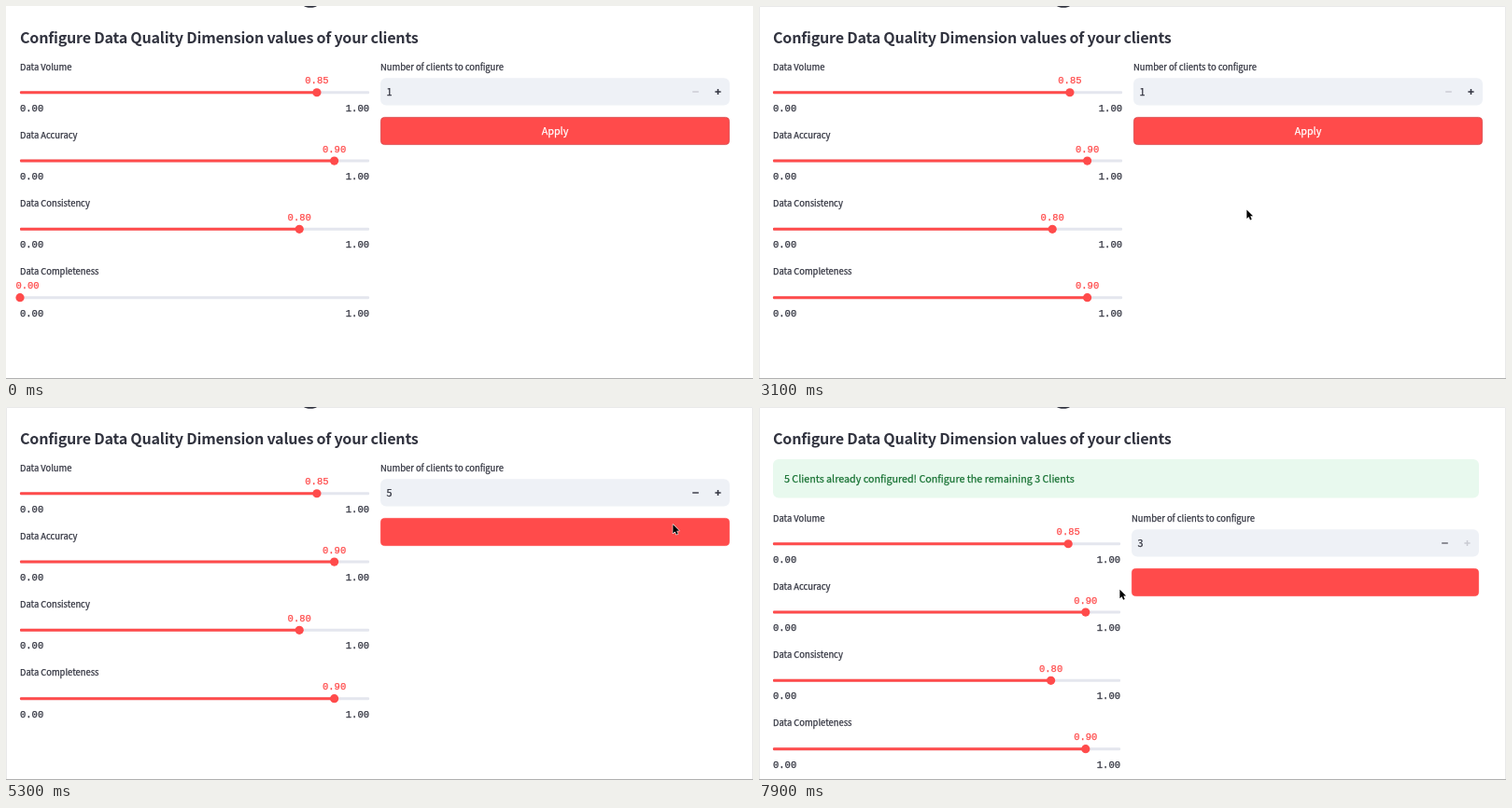
Recreate the animation shown at these times as an HTML page. Size 800x400 px, loop 8000 ms.

```html
<!DOCTYPE html>
<html lang="en">
<head>
<meta charset="utf-8">
<title>Client quality sliders</title>
<style>
  html, body { margin: 0; width: 100%; height: 100%; overflow: hidden; background: #fff; }
  svg { display: block; width: 800px; height: 400px; }
  text {
    font-family: "Noto Sans CJK JP", "Noto Sans CJK SC", "Noto Sans CJK", "Noto Sans", sans-serif;
    fill: currentColor; stroke: currentColor; stroke-width: .25px;
  }
  .title { font-size: 16.1px; font-weight: 600; letter-spacing: -.23px; stroke: none; }
  .label { font-size: 9.4px; }
  .body { font-size: 10.74px; }
  .mono { font-family: "Liberation Mono", "DejaVu Sans Mono", monospace; font-size: 10.5px; }
</style>
</head>
<body>
<svg id="stage" viewBox="0 0 800 400"></svg>
<script>
const LOOP = 8000, STEP = 100;
const RED = '#ff4b4b', INK = '#31333f', MID = '#64656e', PALE = '#c9cbd2';
const ROW = 73.3;                // distance between sliders
const GRAB = 1400, DROP = 2800;  // the pointer is a hand in between
const DONE = 5500;               // the page reloads with the success note
const clicks = [3700, 3900, 4100, 4200, 7400, 7600];

// pointer legs: each starts where the one before ended
const home = { x: 95, y: 314 };
const legs = [
  { from: 400, to: 700, x: 17, y: 313 },
  { from: 700, to: 1300, x: 145, y: 320.5 },
  { from: GRAB, to: 2600, x: 352, y: 313 },
  { from: 2700, to: 3600, x: 760.5, y: 86.5 },
  { from: 4000, to: 4100, x: 652, y: 124.5 },
  { from: 5000, to: 5300, x: 714.3, y: 126 },
  { from: 5300, to: 5600, x: 453.5, y: 121.5 },
  { from: 5900, to: 6700, x: 757, y: 147.3 },
  { from: 7800, to: 7900, x: 386.4, y: 195.8 }
];

const within = (t, a, b) => t >= a && t < b;
const lerp = (a, b, u) => a + (b - a) * u;
const progress = (t, a, b) => Math.min(1, Math.max(0, (t - a) / (b - a)));
const smooth = u => u * u * (3 - 2 * u);

function pointer(t) {
  return legs.reduce((p, leg) => {
    const u = smooth(progress(t, leg.from, leg.to));
    return { x: lerp(p.x, leg.x, u), y: lerp(p.y, leg.y, u) };
  }, home);
}

// drag: steady start, slowing down, then a last nudge
function completeness(t) {
  const slow = 1 - (1 - progress(t, 1300, 2200)) ** 2;
  return .33 * progress(t, 700, 1300) + .54 * slow + .03 * progress(t, 2200, 2600);
}

const count = t => 1 + clicks.filter(c => c <= t && (c >= DONE) === (t >= DONE)).length;

const rect = (x, y, w, h, fill, extra = '') =>
  `<rect x="${x}" y="${y}" width="${w}" height="${h}" fill="${fill}" ${extra}/>`;
const text = (cls, x, y, str, color = INK, anchor = 'start') =>
  `<text class="${cls}" x="${x}" y="${y}" text-anchor="${anchor}" color="${color}">${str}</text>`;
const path = (d, extra) => `<path d="${d}" ${extra}/>`;

function slider(name, y, width, value, shown = value) {
  const x = 15 + width * value, cy = y + 27.75;
  return text('label', 15, y + 3.5, name)
    + text('mono', Math.max(10.4, x - 12.6), y + 18.3, shown.toFixed(2), RED)
    + rect(15, cy - 1.5, width, 3, '#e4e6ee', 'rx="1"')
    + rect(15, cy - 1.5, width * value, 3, RED, 'rx="1"')
    + `<circle cx="${x}" cy="${cy}" r="4.6" fill="${RED}"/>`
    + text('mono', 15, y + 47.6, '0.00')
    + text('mono', 15 + width, y + 47.6, '1.00', INK, 'end');
}

function form(t, left, right, y) {
  const w = right - left, cy = y + 27, px = right - 12.5, mx = right - 36.5;
  const hot = within(t, 3500, 4500) || within(t, 6600, 7600);
  const over = within(t, 4100, DONE) || t >= 7900;
  const minus = within(t, 4200, DONE) ? INK : within(t, 4100, 4200) || t >= 7400 ? MID : PALE;
  const plus = hot ? '#fff' : t >= 7600 ? PALE : INK;
  const top = y + 12.2, bottom = y + 41.6;
  return text('label', left, y + 3.5, 'Number of clients to configure')
    + rect(left, top, w, 29.4, '#eef1f6', 'rx="6"')
    + (hot ? path(`M${right - 25} ${top}H${right - 6}q6 0 6 6V${bottom - 6}q0 6-6 6H${right - 25}z`, `fill="${RED}"`) : '')
    + path(`M${mx - 3.3} ${cy}h6.6`, `stroke="${minus}" stroke-width="1.4"`)
    + path(`M${px - 3.1} ${cy}h6.2m-3.1-3.1v6.2`, `stroke="${plus}" stroke-width="1.5"`)
    + text('body', left + 6.5, y + 31.4, count(t))
    + rect(left + .4, y + 54.4, w - .8, 29.2, RED, `rx="4" stroke="${over ? RED : '#d64649'}" stroke-width=".8"`)
    + (over ? '' : text('body', left + w / 2, y + 72.8, 'Apply', '#fff', 'middle'));
}

const arrow = ({ x, y }) => `<g transform="translate(${x} ${y}) scale(.92)">`
  + path('M0 0V10.3L2.4 8.1L4 11.8L5.8 11L4.2 7.4H7.3Z',
    'fill="#000" stroke="#fff" stroke-width="1.2" paint-order="stroke" stroke-linejoin="round"')
  + '</g>';

const hand = (x, y) => `<g transform="translate(${x} ${y})" stroke="#000" stroke-linecap="round">`
  + path('M-3.6-2.6Q-3.3-4.6-1.8-3.8Q-.8-5.2.5-4Q1.8-4.9 2.6-3.5Q4.6-3.6 4.5-1.4Q4.6 1.4 3.2 3V4.7H-2.3V3.4L-4.3.9Q-5.3-.8-3.6-1Z',
    'fill="#fff" stroke-width="1.1" stroke-linejoin="round"')
  + path('M-1.3-.8v1.8M.6-.8v1.8M2.4-.8v1.8', 'fill="none" stroke-width=".6"')
  + '</g>';

function cursor(t) {
  if (t < 300) return '';
  return within(t, GRAB, DROP) ? hand(15.5 + 374 * completeness(t), 313) : arrow(pointer(t));
}

function scene(t) {
  const done = t >= DONE, width = done ? 372 : 374, y = done ? 119 : 65;
  // the printed value trails the dragged thumb a little
  const rows = [['Volume', .85], ['Accuracy', .9], ['Consistency', .8],
    ['Completeness', completeness(t), completeness(t - 35)]];
  return rect(0, 0, 800, 400, '#fff')
    + (t >= 500 ? path('M.5 400V.5H799.5V400', 'fill="none" stroke="#e9e9e9"') : '')
    + path('M319 0Q321 1.8 326 1.8T333 0Z', `fill="${INK}"`)
    + rect(0, 399, 800, 1, '#b0b0b0')
    + text('title', 15, 39.8, 'Configure Data Quality Dimension values of your clients')
    + (done ? rect(15, 56, 756, 41.5, '#e8f9ee', 'rx="6"')
      + text('body', 27, 81.2, '5 Clients already configured! Configure the remaining 3 Clients', '#177233') : '')
    + rows.map(([name, ...values], i) => slider('Data ' + name, y + i * ROW, width, ...values)).join('')
    + form(t, done ? 399 : 401, done ? 771 : 775, y)
    + cursor(t);
}

const stage = document.getElementById('stage');
const start = performance.now();
let drawn = -1;

function tick() {
  const t = Math.floor((performance.now() - start) % LOOP / STEP) * STEP;
  if (t !== drawn) stage.innerHTML = scene(drawn = t);
  requestAnimationFrame(tick);
}
tick();
</script>
</body>
</html>
```
